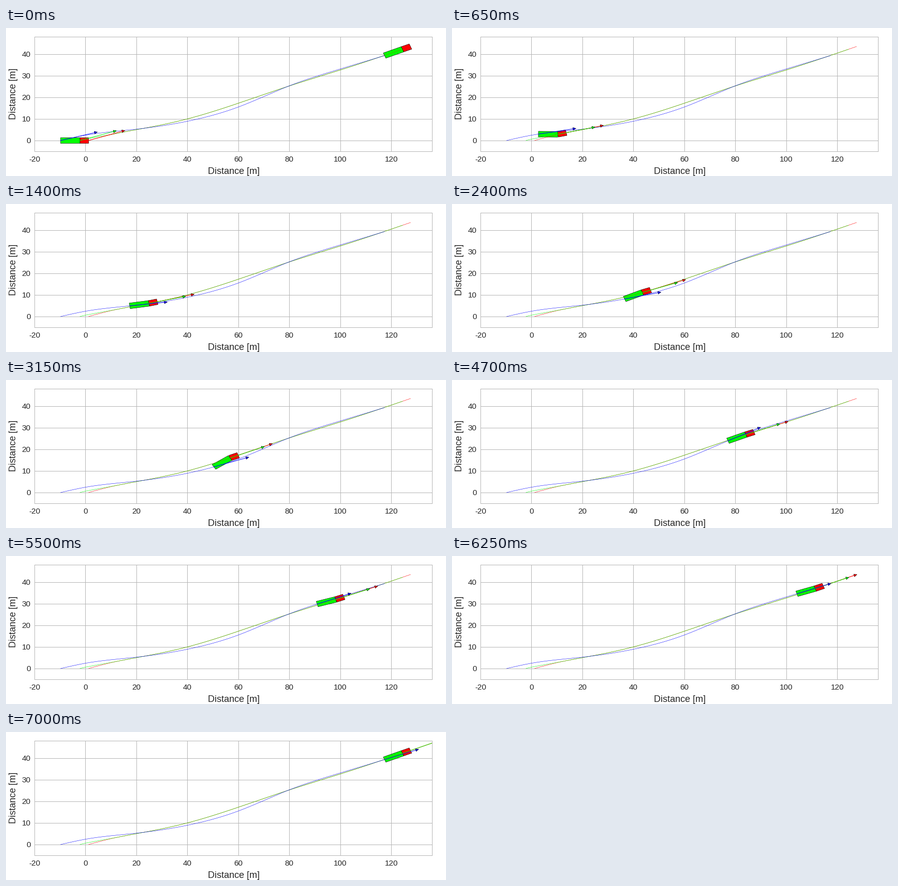
A matplotlib script that plays this animation: 850 by 288 pixels, repeating every 7.05 s.

```python
import numpy as np
import matplotlib.pyplot as plt
from matplotlib.animation import FuncAnimation
from matplotlib.patches import Polygon

W, H, DPI = 850, 288, 100
FRAMES, INTERVAL = 141, 50
LEFT, RIGHT, TOP, BOTTOM = 55, 823, 17, 240
XLIM, YLIM = (-20, 136), (-5, 48)
SCALE = np.array([(RIGHT - LEFT) / (XLIM[1] - XLIM[0]),
                  (BOTTOM - TOP) / (YLIM[1] - YLIM[0])])
PT = 72 / DPI
INK, GRID = "#262626", "#b6b6b6"
RED, GREEN, BLUE = "#ff0000", "#00ff00", "#0000ff"
TRAILER, TRACTOR, HALF = 7.6, 3.4, 1.3
REAR_START, HITCH_START = -9.75, -2.2

plt.rcParams["font.family"] = "Liberation Sans"


def spline(*knots):
    """Natural cubic spline through (x, y) knots."""
    x, y = np.array(knots, float).T
    n, h = len(x), np.diff(x)
    a, b = np.eye(n), np.zeros(n)
    for i in range(1, n - 1):
        a[i, i - 1:i + 2] = h[i - 1], 2 * (h[i - 1] + h[i]), h[i]
        b[i] = 6 * ((y[i + 1] - y[i]) / h[i] - (y[i] - y[i - 1]) / h[i - 1])
    m = np.linalg.solve(a, b)

    def f(q):
        i = np.clip(np.searchsorted(x, q) - 1, 0, n - 2)
        u, v = x[i + 1] - q, q - x[i]
        return ((m[i] * u**3 + m[i + 1] * v**3) / (6 * h[i])
                + (y[i] / h[i] - m[i] * h[i] / 6) * u
                + (y[i + 1] / h[i] - m[i + 1] * h[i] / 6) * v)
    return f


# Ground tracks in metres
rear_y = spline((REAR_START, 0), (0, 2.45), (20, 5.25), (40, 8.9),
                (60, 15.5), (80, 25.3), (100, 33.1), (117, 39.15))
front_y = spline((1.2, 0), (10, 2.7), (20, 5), (40, 10),
                 (60, 17.25), (80, 25.25), (100, 32.6), (127, 43.25))


def hitch_y(x):
    """The hitch swings in from its start, then follows the front."""
    offset = -front_y(HITCH_START)
    return front_y(x) + offset * np.exp(-((x - HITCH_START) / 8)**2)


def speed(t):
    return 18.66 + 1.1 / (1 + (t / 2.6)**3)


# Rear position over time, from speed along its track
times = np.arange(FRAMES) * INTERVAL / 1000
mid = (times[1:] + times[:-1]) / 2
travel = np.append(0, np.cumsum(speed(mid) * np.diff(times)))
grid_x = np.linspace(REAR_START, 125, 2000)
arc = np.append(0, np.cumsum(np.hypot(np.diff(grid_x), np.diff(rear_y(grid_x)))))
rear_x = np.interp(travel, arc, grid_x)


def ahead(p, dist, track):
    """Point on a track at a fixed distance in front of p."""
    x = p[0] + dist
    for _ in range(25):
        x = p[0] + np.sqrt(dist**2 - (track(x) - p[1])**2)
    return np.array([x, track(x)])


def pose(k):
    rear = np.array([rear_x[k], rear_y(rear_x[k])])
    hitch = ahead(rear, TRAILER, hitch_y)
    return rear, hitch, ahead(hitch, TRACTOR, front_y)


def box(a, b):
    d = (b - a) / np.hypot(*(b - a))
    n = HALF * np.array([-d[1], d[0]])
    return np.array([a + n, b + n, b - n, a - n])


fig = plt.figure(figsize=(W / DPI, H / DPI), dpi=DPI, facecolor="white")
ax = fig.add_axes([LEFT / W, 1 - BOTTOM / H,
                   (RIGHT - LEFT) / W, (BOTTOM - TOP) / H])
ax.set(xlim=XLIM, ylim=YLIM, xticks=range(-20, 121, 20), yticks=range(0, 41, 10))
ax.set_axisbelow(True)
ax.grid(color=GRID, lw=PT)
ax.tick_params(length=0, labelbottom=False, labelleft=False)
for s in ax.spines.values():
    s.set(color=GRID, linewidth=PT)


def label(x, y, s, px, va="center_baseline", **kw):
    fig.text(x / W, 1 - y / H, s, fontsize=px * PT, color=INK, va=va, **kw)


for v in ax.get_xticks():
    label(LEFT + (v - XLIM[0]) * SCALE[0], 255, f"{v:.0f}", 15.3, ha="center")
for v in ax.get_yticks():
    label(47.5, BOTTOM - (v - YLIM[0]) * SCALE[1], f"{v:.0f}", 15.3, ha="right")
label(440, 279.5, "Distance [m]", 18, "center", ha="center")
label(14.5, 128, "Distance [m]", 18, "center", ha="center", rotation=90)


def body(color):
    return ax.add_patch(Polygon(np.zeros((4, 2)), fc=color, ec="black",
                                lw=0.6 * PT, zorder=2))


class Arrow:
    def __init__(self, color):
        self.shaft, = ax.plot([], [], color=color, lw=0.9 * PT, zorder=4)
        self.head = ax.add_patch(Polygon(np.zeros((3, 2)), fc=color, ec="black",
                                         lw=0.6 * PT, zorder=5))

    def place(self, p, track, length):
        slope = (track(p[0] + 0.1) - track(p[0] - 0.1)) / 0.2
        tip = p + length * np.array([1, slope]) / np.hypot(1, slope)
        self.shaft.set_data([p[0], tip[0]], [p[1], tip[1]])
        d = (tip - p) * SCALE
        d /= np.hypot(*d)
        n = np.array([-d[1], d[0]])
        self.head.set_xy([tip, tip + (2.6 * n - 5.5 * d) / SCALE,
                          tip - (2.6 * n + 5.5 * d) / SCALE])


start, end = pose(0), pose(FRAMES - 1)
tracks = (rear_y, hitch_y, front_y)
for i, color in ((2, RED), (1, GREEN), (0, BLUE)):
    xs = np.linspace(start[i][0], end[i][0], 400)
    ax.plot(xs, tracks[i](xs), color=color, lw=0.55 * PT, zorder=3)

parked = [body(RED), body(GREEN)]
truck = [body(RED), body(GREEN)]
arrows = [(2, Arrow(RED)), (1, Arrow(GREEN)), (0, Arrow(BLUE))]


def place_truck(parts, points):
    rear, hitch, front = points
    parts[0].set_xy(box(hitch, front))
    parts[1].set_xy(box(rear, hitch))


place_truck(parked, end)


def update(k):
    points = pose(k)
    place_truck(truck, points)
    for i, arrow in arrows:
        arrow.place(points[i], tracks[i], 0.755 * speed(times[k]))
    # The finished truck lingers as each loop restarts
    for p in parked:
        p.set_visible(k == 0)
    return []


anim = FuncAnimation(fig, update, frames=FRAMES, interval=INTERVAL,
                     init_func=lambda: update(0), repeat=True, repeat_delay=0,
                     blit=False)
plt.show()
```
